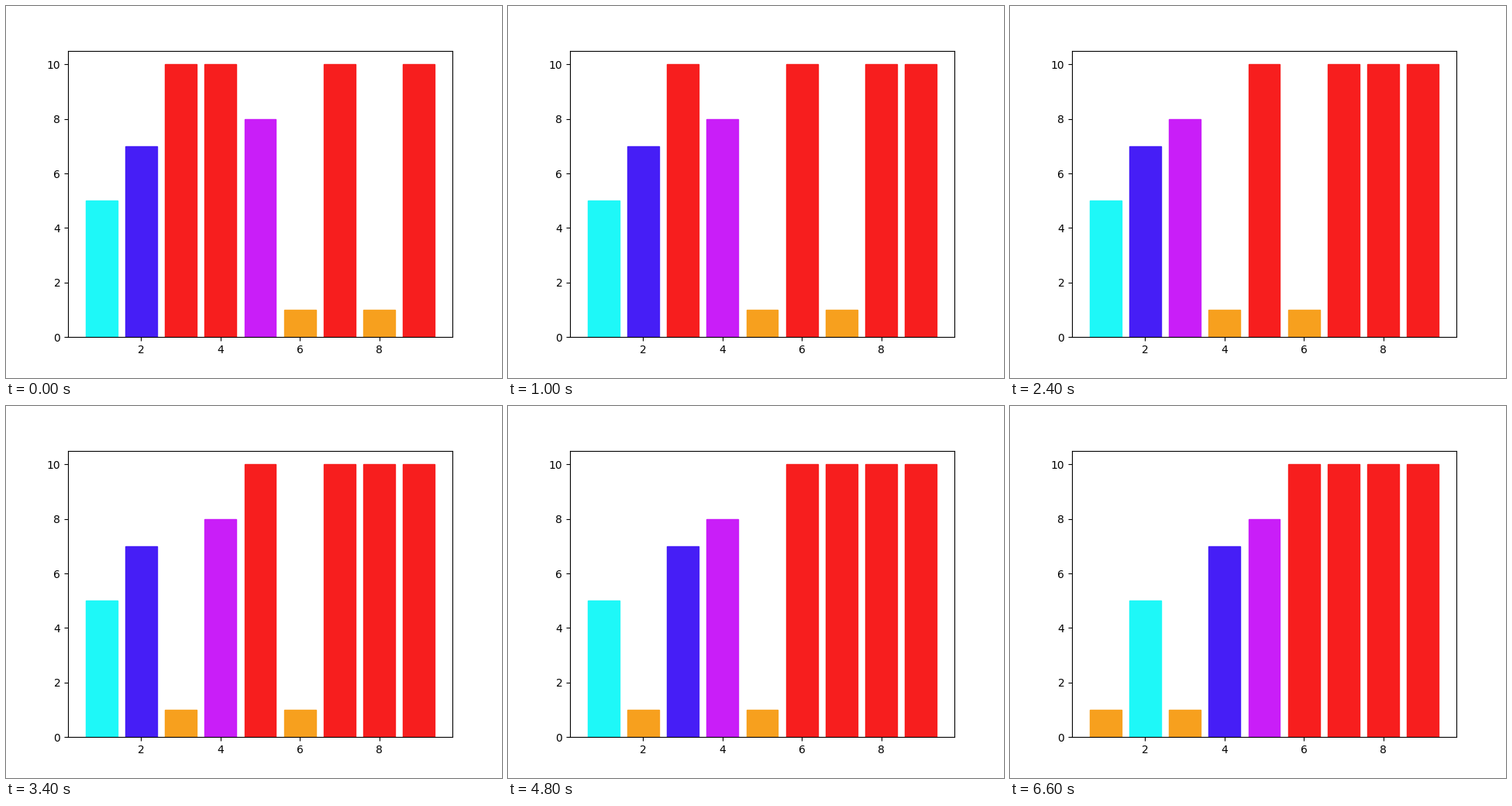
Animation of 640x480 px, one loop 8 s. Source, as a matplotlib script:

```python
import matplotlib.pyplot as plt
from matplotlib.animation import FuncAnimation

START = [5, 7, 10, 10, 8, 1, 10, 1, 10]
COLORS = {1: "#f7a01e", 5: "#1ef8f8", 7: "#461ef6", 8: "#c91ef8", 10: "#f71e1e"}
STEP_MS = 200
FRAMES = 40


def sort_state(frame):
    """Values after the bubble sort comparisons made up to this frame."""
    values = START.copy()
    pairs = len(values) - 1
    for step in range(frame + 1):
        j = (step + 1) % pairs
        if values[j] > values[j + 1]:
            values[j], values[j + 1] = values[j + 1], values[j]
    return values


fig, ax = plt.subplots(figsize=(6.4, 4.8), dpi=100)
bars = ax.bar(range(1, len(START) + 1), START)


def draw(frame):
    for bar, value in zip(bars, sort_state(frame)):
        bar.set_height(value)
        bar.set_color(COLORS[value])
    return list(bars)


anim = FuncAnimation(fig, draw, frames=FRAMES, interval=STEP_MS,
                     repeat=True, repeat_delay=0, blit=False)
plt.show()
```
